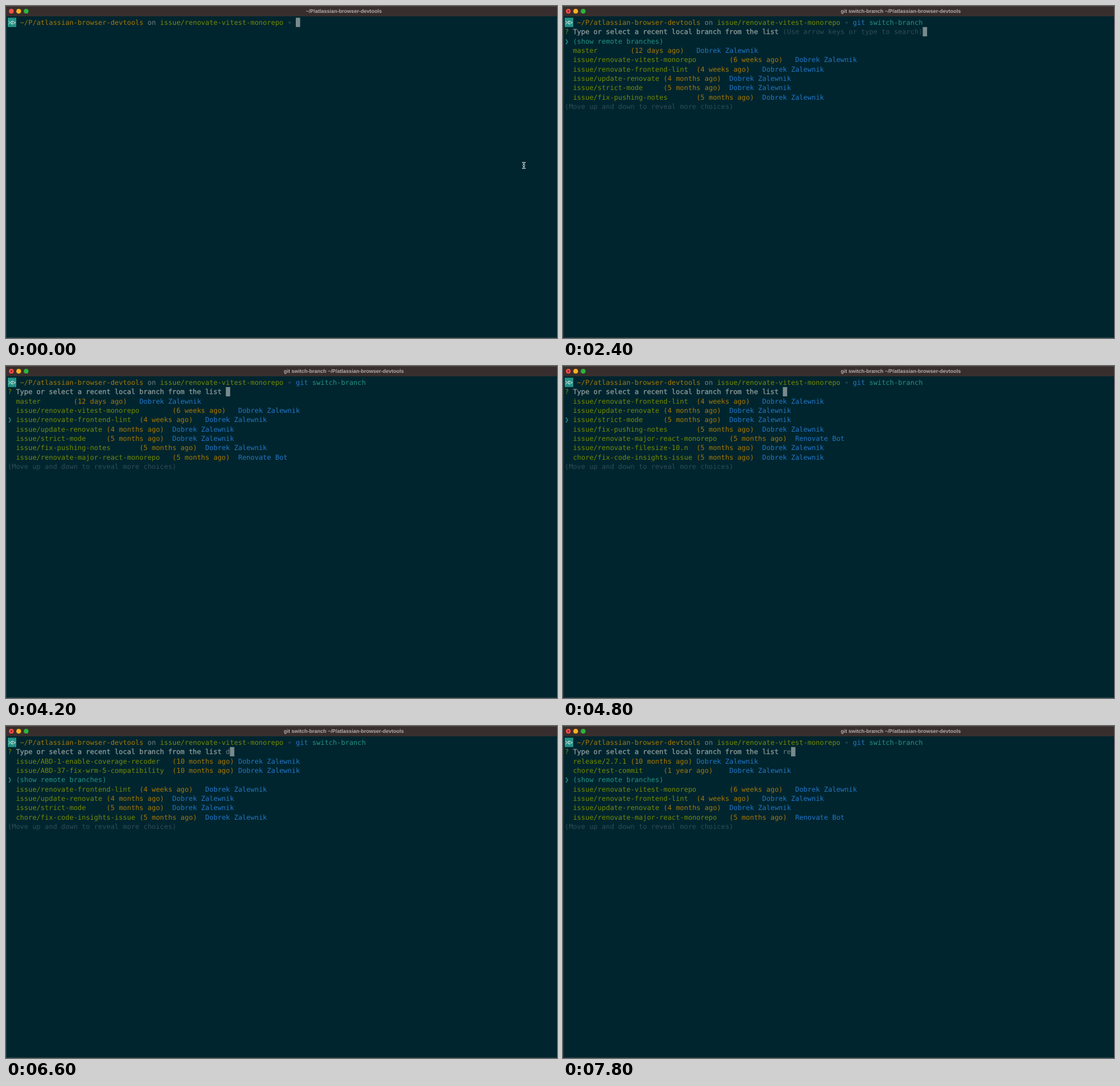
Recreate the animation shown at these times as an HTML page. Size 964 px wide and 581 px high, loop 8000 ms.

```html
<!DOCTYPE html>
<html lang="en">
<head>
<meta charset="utf-8">
<title>Terminal</title>
<style>
  html, body { margin: 0; width: 100%; height: 100%; overflow: hidden; background: #00252e; }
  svg { display: block; width: 964px; height: 581px; }
  text { text-rendering: geometricPrecision; white-space: pre; }
  #screen { font: 11.96px "DejaVu Sans Mono", monospace; }
  #title { font: bold 9px "Liberation Sans", Arial, sans-serif; fill: #b5acaa; text-anchor: middle; }
  .yellow { fill: #a57706; }
  .green { fill: #738a05; }
  .blue { fill: #2176c7; }
  .cyan { fill: #259286; }
  .plain { fill: #708284; }
  .dim { fill: #304c55; }
  .strong { fill: #8f9d9e; stroke: #8f9d9e; stroke-width: .3px; }
  .cursor { fill: #788a8d; }
</style>
</head>
<body>
<svg viewBox="0 0 964 581">
  <rect width="964" height="581" fill="#00252e"/>
  <rect width="964" height="18" fill="#382e2d"/>
  <path d="M0 .5H964" stroke="#51494a"/>
  <path d="M.5 18V580.5H964" fill="none" stroke="#24434b"/>
  <circle cx="9.3" cy="9.2" r="4.1" fill="#ff4f49"/>
  <circle cx="22.2" cy="9.2" r="4.1" fill="#fdb020"/>
  <circle cx="35.3" cy="9.2" r="4.1" fill="#2ab63b"/>
  <circle id="busy" cx="9.3" cy="9.2" r="1.4" fill="#7d1512"/>
  <text id="title" x="591" y="12"></text>
  <rect x="3" y="20.5" width="15" height="16.3" fill="#259286"/>
  <path d="M4.5 26L10.5 32M4.5 32L10.5 26V32M11 26L16.5 29L11 32" fill="none" stroke="#d5e3df"/>
  <circle cx="496.3" cy="29" r="1.5" fill="none" stroke="#365660" stroke-width=".9"/>
  <g id="screen"></g>
  <g id="mouse" fill="none" stroke="#d8dfe0">
    <path d="M902.8 273.7h6.4M902.8 284.3h6.4M904 274L906 277L908 274M904 284L906 281L908 284"/>
    <circle cx="906" cy="279" r="1.7"/>
  </g>
</svg>
<script>
const LOOP = 8000, COL = 7.2, ROW = 16.33, PAGE = 7;
const $ = id => document.getElementById(id);

const path = '~/P/atlassian-browser-devtools';
const author = 'Dobrek Zalewnik', bot = 'Renovate Bot';
const question = 'Type or select a recent local branch from the list';
const hint = '(Use arrow keys or type to search)';

const remote = { name: '(show remote branches)' };
const branches = [
  ['master', '12 days'],
  ['issue/renovate-vitest-monorepo', '6 weeks'],
  ['issue/renovate-frontend-lint', '4 weeks'],
  ['issue/update-renovate', '4 months'],
  ['issue/strict-mode', '5 months'],
  ['issue/fix-pushing-notes', '5 months'],
  ['issue/renovate-major-react-monorepo', '5 months', bot],
  ['issue/renovate-filesize-10.n', '5 months'],
  ['chore/fix-code-insights-issue', '5 months'],
  ['issue/ABD-1-enable-coverage-recoder', '10 months'],
  ['issue/ABD-37-fix-wrm-5-compatibility', '10 months'],
  ['release/2.7.1', '10 months'],
  ['chore/test-commit', '1 year']
].map(([name, age, by = author]) => ({ name, age: `(${age} ago)`, by }));

// Each step overrides only the values that change.
const steps = [
  [0, { command: '', running: false, list: false, hint: true, index: 0, top: 0, query: '', mouse: true }],
  [600, { command: 'g', mouse: false }],
  [800, { command: 'git' }],
  [1000, { command: 'git swi' }],
  [1200, { command: 'git switch-b' }],
  [1400, { command: 'git switch-branch' }],
  [2000, { running: true }],
  [2400, { list: true }],
  [3600, { hint: false, index: 1 }],
  [3800, { index: 2 }],
  [4200, { index: 3, top: 1 }],
  [4400, { index: 4, top: 2 }],
  [4800, { index: 5, top: 3 }],
  [5000, { index: 6, top: 4 }],
  [5400, { index: 7, top: 5 }],
  [5800, { index: 8, top: 6 }],
  [6400, { query: 'd', index: 0, top: -2 }],
  [7000, { query: '' }],
  [7200, { query: 'r' }],
  [7600, { query: 're' }]
];
let state = {};
const states = steps.map(([at, change]) => ({ at, ...(state = { ...state, ...change }) }));

const text = (row, col, style, value) =>
  `<text class="${style}" x="${3 + col * COL}" y="${33 + row * ROW}">${value}</text>`;
const cursor = (row, col) =>
  `<rect class="cursor" x="${3 + col * COL}" y="${20.5 + row * ROW}" width="7.6" height="16.3"/>`;
const nextTab = col => (Math.floor(col / 8) + 1) * 8;

function drawChoice(row, choice) {
  if (choice === remote) return text(row, 2, 'cyan', choice.name);
  const ageCol = nextTab(2 + choice.name.length);
  const byCol = nextTab(ageCol + choice.age.length);
  return text(row, 2, 'green', choice.name) +
    text(row, ageCol, 'yellow', choice.age) +
    text(row, byCol, 'blue', choice.by);
}

function drawList({ query, index, top, hint: showHint }) {
  const choices = [remote, ...branches.filter(b => b.name.toLowerCase().includes(query))];
  let out = text(1, 0, 'green', '?') + text(1, 2, 'strong', question);
  const typed = showHint ? hint : query;
  out += text(1, 53, showHint ? 'dim' : 'plain', typed) + cursor(1, 53 + typed.length);
  for (let i = 0; i < PAGE; i++) {
    const n = (top + i + choices.length) % choices.length;
    if (n === index) out += text(2 + i, 0, 'cyan', '❯');
    out += drawChoice(2 + i, choices[n]);
  }
  return out + text(9, 0, 'dim', '(Move up and down to reveal more choices)');
}

function draw(s) {
  $('title').textContent = s.running ? `git switch-branch ${path}` : path;
  $('busy').style.display = s.running ? '' : 'none';
  $('mouse').style.display = s.mouse ? '' : 'none';
  let out = text(0, 3, 'yellow', path) + text(0, 34, 'plain', 'on') +
    text(0, 37, 'green', 'issue/renovate-vitest-monorepo') +
    text(0, 70, 'blue', s.command.slice(0, 3)) +
    text(0, 74, 'cyan', s.command.slice(4));
  if (s.list) out += drawList(s);
  else out += s.running ? cursor(1, 0) : cursor(0, 70 + s.command.length);
  $('screen').innerHTML = out;
}

let shown;
const start = performance.now();
function tick() {
  const time = Math.max(0, performance.now() - start) % LOOP;
  const now = states.findLast(s => s.at <= time);
  if (now !== shown) draw(shown = now);
  requestAnimationFrame(tick);
}
tick();
</script>
</body>
</html>
```
